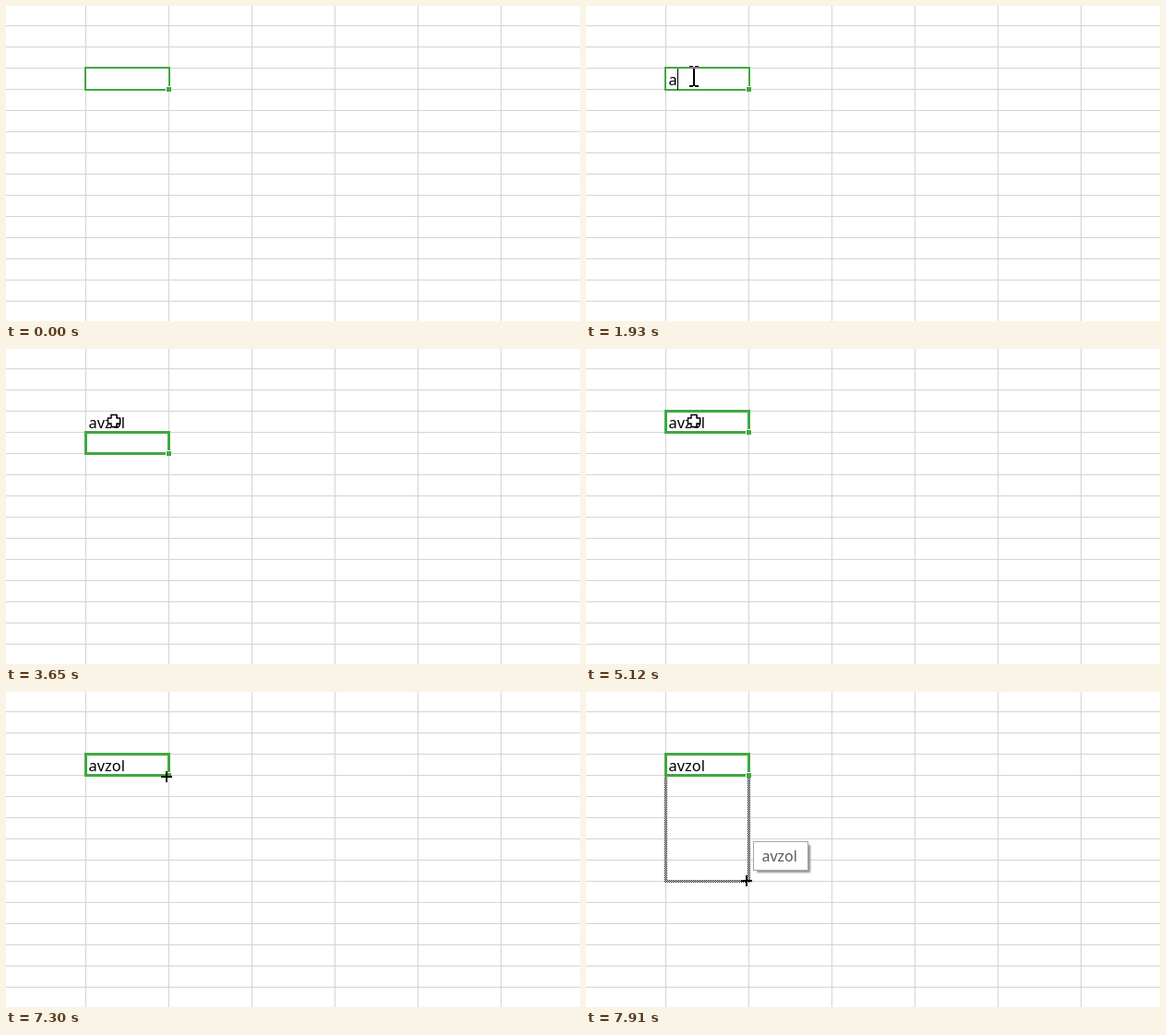
These frames come from a looping animation (622x342 px, 7990 ms). An HTML page:

```html
<!DOCTYPE html>
<html lang="en">
<head>
<meta charset="utf-8">
<title>Spreadsheet fill handle</title>
<style>
  html, body { margin: 0; width: 100%; height: 100%; overflow: hidden; background: #fff; }
  svg { display: block; width: 622px; height: 342px; shape-rendering: crispEdges; }
  text { font-family: "Noto Sans", "Open Sans", sans-serif; }
  .beam { mix-blend-mode: difference; fill: #fff; }
  .frame { fill: none; stroke: #40a840; }
  .handle { fill: #40a840; }
  .shadow { filter: blur(1px); }
</style>
</head>
<body>
<svg viewBox="0 0 622 342">
  <defs>
    <pattern id="grid" x="86" y="21" width="90" height="23" patternUnits="userSpaceOnUse">
      <path d="M.5 0V23M0 .5H90" stroke="#d4d4d4"/>
    </pattern>
    <pattern id="checker" width="2" height="2" patternUnits="userSpaceOnUse">
      <rect width="2" height="2" fill="#fff"/>
      <path d="M0 0h1v2h1v-1h-2z" fill="#111"/>
    </pattern>
  </defs>
  <rect width="622" height="342" fill="#fff"/>
  <rect width="622" height="342" fill="url(#grid)"/>

  <rect id="range" x="86.5" y="90.5" width="90" fill="none" stroke="url(#checker)" stroke-width="3"/>
  <g id="selection">
    <rect id="thin" class="frame" x="86" y="67" width="91" height="24" stroke-width="2"/>
    <rect id="thick" class="frame" x="86.5" y="67.5" width="90" height="23" stroke-width="3"/>
    <rect x="173" y="87" width="6" height="6" fill="#fff"/>
    <rect class="handle" x="174" y="88" width="5" height="5"/>
  </g>
  <text id="entry" x="89.5" y="86" font-size="16.4"></text>
  <rect id="caret" y="68" width="1" height="23"/>

  <g id="tip">
    <rect class="shadow" x="185" y="120" width="58" height="30" fill="#8c8c8c"/>
    <rect x="181.5" y="116.5" width="59" height="31" fill="#fff" stroke="#a6a6a6"/>
    <text id="tipText" x="190.5" y="138" font-size="16" fill="#595959"></text>
  </g>

  <g id="cross" shape-rendering="auto">
    <path d="M-3-6.5H3V-3H6.5V3H3V6.5H-3V3H-6.5V-3H-3Z" transform="translate(.8 .8)"/>
    <path d="M-3-6.5H3V-3H6.5V3H3V6.5H-3V3H-6.5V-3H-3Z" fill="#fff" stroke="#000" stroke-width="1.4"/>
  </g>
  <path id="plus" d="M-6-1H-1V-6H1V-1H6V1H1V6H-1V1H-6Z"/>
  <path id="beam" class="beam" d="M-5-14h4v1h2v-1h4v2h-4v19h4v2h-4v-1h-2v1h-4v-2h4v-19h-4z"/>
</svg>
<script>
const LOOP = 7990, WORD = "avzol", ROW = 23;
const $ = id => document.getElementById(id);
const show = (el, on) => { el.style.display = on ? "" : "none"; };
const move = (el, x, y) => el.setAttribute("transform", `translate(${x} ${y})`);

// Last entry whose start time has passed
const hold = (track, t) => track.filter(k => k[0] <= t).pop();

const keyTimes = [1390, 2080, 2400, 2550, 2720];
const caretTrack = [
  [0, 0], [150, 90], [530, 0], [1010, 90], [1390, 99], [1470, 0], [1930, 99], [2080, 108],
  [2250, 0], [2400, 116], [2550, 125], [2720, 0], [3180, 129], [3580, 0]
];
const pointerTrack = [
  [0, "beam", 117, 79], [3650, "cross", 117, 78],
  [5600, "cross", 126, 78], [5680, "cross", 148, 79], [5750, "cross", 170, 80],
  [5830, "cross", 182, 81], [5910, "cross", 182, 85], [5980, "cross", 182, 88],
  [6130, "cross", 179, 88], [6210, "plus", 175, 89], [6290, "plus", 174, 90],
  [7300, "plus", 174, 92], [7380, "plus", 174, 97], [7450, "plus", 174, 108],
  [7530, "plus", 174, 121], [7610, "plus", 174, 138], [7680, "plus", 174, 155],
  [7760, "plus", 174, 172], [7840, "plus", 174, 189], [7910, "plus", 174, 205]
];

function pointerAt(t) {
  if (t < 150) return ["", 0, 0];
  if (t >= 840) return hold(pointerTrack, t).slice(1);
  const p = Math.floor((t - 150) / 76.6) / 9;
  const rest = (1 - p) ** 2;
  const x = Math.round(117 + 329 * rest), y = Math.round(79 + 223 * rest);
  return [x < 176 && y < 90 ? "beam" : "cross", x, y];
}

function render(t) {
  $("entry").textContent = WORD.slice(0, keyTimes.filter(k => k <= t).length);

  const caretX = hold(caretTrack, t)[1];
  show($("caret"), caretX);
  $("caret").setAttribute("x", caretX);

  const editing = t < 3580;
  show($("thin"), editing);
  show($("thick"), !editing);
  move($("selection"), 0, !editing && t < 5120 ? ROW : 0);

  const [kind, x, y] = pointerAt(t);
  for (const id of ["beam", "cross", "plus"]) {
    show($(id), id === kind);
    move($(id), x, y);
  }

  // The tooltip trails the dragged range by two rows
  const rows = t < 7300 ? 0 : Math.max(0, Math.round((y - 100) / ROW));
  show($("range"), rows);
  show($("tip"), rows);
  $("range").setAttribute("height", rows * ROW);
  move($("tip"), 0, Math.max(0, rows - 3) * ROW);
}

$("tipText").textContent = WORD;
const start = performance.now();
function tick() {
  render((performance.now() - start) % LOOP);
  requestAnimationFrame(tick);
}
tick();
</script>
</body>
</html>
```
